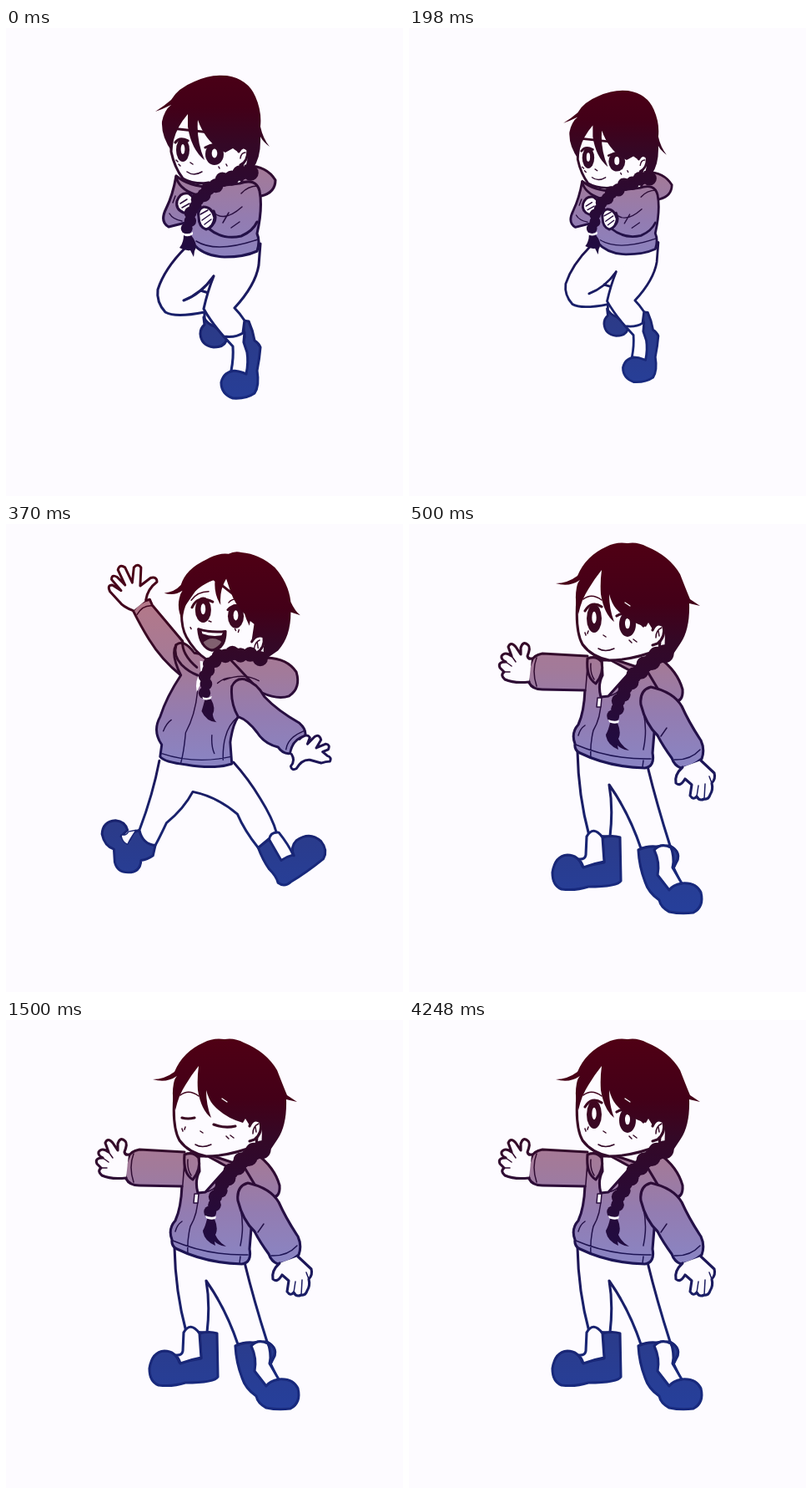
An HTML page for the animation above (6 s loop, 476 by 560 pixels).

```html
<!DOCTYPE html>
<html lang="en">
<head>
<meta charset="utf-8">
<title>Jump and wave</title>
<style>
html, body { margin: 0; width: 100%; height: 100%; overflow: hidden; background: #fdfbff; }
svg { display: block; width: 100vw; height: 100vh; }
path, ellipse { stroke: url(#ink); stroke-width: 3.1; stroke-linecap: round; stroke-linejoin: round; fill: none; }
.skin { fill: #fdfbff; }
.cloth { fill: url(#cloth); }
.boot { fill: url(#boot); }
.hair, .hair circle { fill: url(#hair); stroke: none; }
.dark { fill: url(#ink); stroke: none; }
.lite { fill: #fdfbff; stroke: none; }
.thin { stroke-width: 1.5; }
</style>
</head>
<body>
<svg viewBox="0 0 476 560">
<defs>
  <linearGradient id="ink" gradientUnits="userSpaceOnUse" x1="0" y1="40" x2="0" y2="440">
    <stop offset="0" stop-color="#4c0016"/><stop offset=".25" stop-color="#360a26"/>
    <stop offset=".42" stop-color="#2a0c3a"/><stop offset=".6" stop-color="#1d1454"/>
    <stop offset=".75" stop-color="#19206a"/><stop offset="1" stop-color="#182a7e"/>
  </linearGradient>
  <linearGradient id="hair" gradientUnits="userSpaceOnUse" x1="0" y1="20" x2="0" y2="270">
    <stop offset="0" stop-color="#500014"/><stop offset=".3" stop-color="#430018"/>
    <stop offset=".48" stop-color="#340826"/><stop offset="1" stop-color="#200c42"/>
  </linearGradient>
  <linearGradient id="cloth" gradientUnits="userSpaceOnUse" x1="0" y1="85" x2="0" y2="285">
    <stop offset="0" stop-color="#b47888"/><stop offset=".45" stop-color="#a27a9a"/>
    <stop offset=".72" stop-color="#937cb1"/><stop offset="1" stop-color="#8a84c2"/>
  </linearGradient>
  <linearGradient id="boot" gradientUnits="userSpaceOnUse" x1="0" y1="350" x2="0" y2="460">
    <stop offset="0" stop-color="#2c3a86"/><stop offset="1" stop-color="#263f9a"/>
  </linearGradient>
</defs>

<g id="crouch">
  <path class="boot" d="M237 346Q241 354 250 357L265 370Q264 382 249 382Q234 380 233 366Q233 359 238 355z"/>
  <path class="skin" d="M215 263Q190 288 182 313Q180 328 191 340Q203 347 238 340"/>
  <path d="M213 326Q234 318 249 297M233 314L246 318M238 340L238 347"/>
  <path class="boot" d="M284 350L291 351Q296 362 298 374Q303 377 305 382Q304 395 301 410Q304 428 298 437Q288 444 272 443Q258 438 258 424Q261 411 275 410L286 370z"/>
  <path class="skin" d="M261 369L272 381Q273 395 270 410Q279 410 288 414Q291 400 289 388L285 376L286 364z"/>
  <path class="skin" d="M249 297Q242 314 237 336Q246 352 261 369Q275 371 284 365L286 350Q280 341 274 335Q299 308 303 284L305 258"/>
  <path class="cloth" d="M287 165Q312 164 323 182Q323 197 306 201L280 195z"/>
  <path class="cloth" d="M204 177Q200 200 192 216Q184 232 195 238L215 233L224 258Q237 273 262 274Q286 274 301 267Q305 255 301 246Q308 215 304 195Q300 179 280 186L245 190Q220 190 204 177z"/>
  <path d="M243 240Q260 254 282 249Q296 243 301 232M249 219Q255 231 243 240M204 178Q207 192 226 199"/>
  <path class="thin" d="M252 223Q264 231 283 214M260 233L267 221M196 222Q200 229 211 231M228 255Q252 270 302 253M282 198Q290 189 302 189M270 239L280 232M200 209L203 201"/>
  <path class="skin" d="M205 207Q209 196 219 198Q228 204 226 212Q222 222 213 221Q203 217 205 207z"/>
  <path class="skin" d="M198 120L198 148Q202 167 212 180Q225 188 248 185L282 172L290 130z"/>
  <path class="skin" d="M279 148Q284 139 290 146Q290 160 281 164"/>
  <path class="thin" d="M281 156Q282 149 287 149M217 172Q225 178 235 172M221 161L224 163M204 158L206 160M207 163L209 165M255 166L256 168M264 163L265 165"/>
  <g class="eyes" data-e="212 146 8 14 250 151 11 13"></g>
  <path d="M203 137Q208 130 218 135M239 143Q252 136 266 145"/>
  <path class="hair" d="M179 100Q190 93 198 86Q206 72 226 64Q245 55 265 57Q290 61 299 82Q307 100 305 118Q308 132 316 142Q308 136 305 130Q306 155 296 168L286 170Q291 155 290 146Q285 140 279 149L272 144L263 149Q240 138 230 110Q228 135 238 158Q222 145 218 118L218 103Q205 118 201 134L199 148Q186 130 187 112Q190 98 198 92Q188 97 179 100z"/>
  <g class="hair braid" data-b="293 172 224 186 218 240 9.5 7"></g>
  <path class="hair" d="M213 248L222 248Q231 259 226 267L225 274L221 266Q215 267 208 263Q213 257 213 248z"/>
  <path class="lite" d="M212 245Q218 248 224 244L224 247Q218 251 213 248z"/>
  <path class="skin" d="M231 226Q229 217 237 214Q247 214 250 227Q249 238 240 241Q231 238 231 226z"/>
  <path class="thin" d="M209 210L217 205M211 215L220 210M233 223L242 218M235 230L245 223M238 235L246 229"/>
</g>

<g id="leap">
  <path class="boot" d="M126 360Q110 361 109 377Q112 392 124 396L125 412Q128 425 142 425Q157 425 158 410Q166 409 173 404L176 391Q161 389 156 372L148 375L144 384L133 380L141 372Q138 361 126 360z"/>
  <path class="boot" d="M305 394L319 383L328 395L350 404Q345 393 353 385Q370 373 384 386Q393 397 387 408Q366 425 346 437Q338 444 330 438Q328 430 319 421Q311 410 305 394z"/>
  <path class="skin" d="M181 285Q173 327 156 372Q160 390 176 391Q181 382 190 363Q212 345 223 324Q253 330 279 352Q288 373 305 394L328 375Q323 357 308 333Q293 308 274 287"/>
  <path class="skin thin" d="M133 378Q140 379 142 374L152 372Q145 382 141 390Q134 387 133 378z"/>
  <path class="skin" d="M319 384Q320 374 331 375Q343 390 349 403Q341 405 334 410z"/>
  <path class="cloth" d="M316 156Q342 157 353 174Q359 194 344 204Q330 209 310 200L270 185L262 158z"/>
  <path class="cloth" d="M148 97Q155 86 169 83L172 90Q188 109 210 135L218 165L208 178Q184 159 168 133Q158 117 148 97z"/>
  <path class="cloth" d="M208 178Q190 205 182 230Q172 248 184 265L182 280Q187 287 215 290Q250 296 272 289L270 262Q273 240 280 230L300 190L270 158L225 150Q212 132 202 140Q195 152 208 178z"/>
  <path class="cloth" d="M272 192Q277 181 288 183Q304 188 313 205Q329 222 357 238Q366 246 364 254Q348 258 345 276Q336 277 330 268Q313 264 304 250Q292 234 280 230Q270 213 272 192"/>
  <path class="lite" d="M232 160L242 162L236 182L228 199Q225 184 233 174z"/>
  <path d="M202 140Q198 153 209 165Q218 174 229 178M210 135Q209 152 228 168"/>
  <path class="thin" d="M229 198Q226 228 214 250Q212 273 208 288M184 276Q226 290 271 280M186 248Q190 238 196 234M262 184Q287 174 306 185M247 253Q246 267 250 276M280 230Q260 245 261 284M153 102Q160 90 172 91M340 271Q342 256 362 248M254 188Q262 181 270 181"/>
  <path class="skin" d="M148 97Q135 92 131 86L119 73Q115 65 122 65L133 72L121 58Q121 51 128 55L138 65L129 46Q131 38 138 43L147 62L149 43Q154 37 158 43L157 66L170 56Q178 54 178 61Q166 70 164 84"/>
  <path class="skin" d="M347 277Q352 285 346 292Q347 298 353 295Q360 283 370 284L384 288Q390 286 395 286Q398 281 392 279L386 274L393 271Q396 265 390 264L378 269L384 259Q382 251 376 255L367 264L370 256Q366 250 357 258"/>
  <path class="skin" d="M209 95Q208 118 215 130Q225 148 240 158L262 158L302 150L304 100L240 50z"/>
  <path class="skin" d="M297 136Q303 126 312 130Q314 143 303 150Q296 151 295 145"/>
  <path class="thin" d="M300 145Q301 136 307 134M304 137L305 144M243 110L246 111M276 120L277 122M281 121L280 124M220 118L221 120M221 84Q229 73 243 73M268 87Q273 81 282 83"/>
  <g class="eyes" data-e="236 96 10 16 277 104 10 15"></g>
  <path d="M222 93Q229 77 248 86M267 96Q277 85 288 97"/>
  <path class="dark" d="M230 120Q245 125 264 123Q264 145 247 147Q232 143 230 120z"/>
  <path class="lite" d="M234 122Q247 126 261 124L259 128Q246 130 235 126z"/>
  <path d="M235 138Q246 127 259 136Q253 145 246 145Q239 144 235 138z" style="fill:#80606f;stroke:none"/>
  <path d="M230 120Q245 125 264 123Q264 145 247 147Q232 143 230 120z"/>
  <path class="hair" d="M187 75Q200 74 208 65Q214 45 240 33Q256 24 268 26Q275 22 284 24Q307 26 326 43Q343 62 346 86Q351 97 358 103L346 99Q346 130 330 147L314 158Q310 148 313 138Q312 127 304 128Q300 130 297 134L300 114L295 110L294 116Q290 108 288 101Q276 90 270 72L265 57Q256 72 258 90Q249 76 251 58Q228 66 217 84Q211 95 210 110Q203 95 206 82Q207 76 210 72Q200 79 187 75z"/>
  <g class="hair braid" data-b="308 156 232 136 239 200 9.5 7.5"></g>
  <path class="hair" d="M238 209L246 208Q252 219 248 227Q249 234 253 237Q240 236 234 223Q236 217 238 209z"/>
  <path class="lite" d="M235 205Q241 208 247 204L246 207Q241 210 236 208z"/>
</g>

<g id="stand">
  <path class="skin" d="M202 272Q203 325 216 373L241 374Q245 340 240 312Q264 346 278 388L313 385Q297 335 286 290"/>
  <path class="boot" d="M232 375Q244 372 253 375L254 427Q250 434 215 434Q200 439 183 437Q172 433 172 417Q175 397 190 396Q203 396 208 410L234 405z"/>
  <path class="skin" d="M212 396L213 374Q221 360 232 375L234 404Q222 406 209 411Q207 404 203 401Q211 402 212 396z"/>
  <path class="boot" d="M275 390Q285 385 296 386L313 385Q324 391 322 402L317 411L326 430Q344 428 350 441Q354 458 341 465Q326 467 312 464Q302 459 300 450Q287 441 283 428Q276 410 275 390z"/>
  <path class="skin" d="M294 390Q302 381 314 387Q320 397 316 411L327 430Q316 432 312 438L298 420Q301 405 294 390z"/>
  <path class="boot" d="M314 386Q325 392 322 401L317 412Q318 397 314 386z"/>
  <path class="cloth" d="M300 160Q322 176 328 198Q329 213 318 212Q300 195 284 192Q275 185 280 172z"/>
  <path class="cloth" d="M214 162L211 198Q210 225 203 240Q194 250 199 263Q198 271 205 274Q240 291 283 292Q295 290 292 274L294 250L300 200L285 175L240 160z"/>
  <path class="cloth" d="M214 158L160 155Q149 157 147 164Q140 178 144 190Q148 198 160 198L211 199"/>
  <path class="cloth" d="M278 216Q276 199 290 195Q317 201 327 218Q336 238 350 259Q355 270 351 281Q339 291 326 292Q318 289 315 280Q304 265 298 253Q284 240 278 216"/>
  <path class="skin" d="M231 163L242 163L266 176L239 206L230 207Q226 192 232 181z"/>
  <path class="cloth" d="M214 161Q225 157 231 165Q234 179 224 191Q212 184 214 161z"/>
  <path class="thin" d="M230 207Q231 230 221 247Q217 263 218 280M200 264Q242 282 290 281M153 160Q147 176 153 194M318 282Q337 283 349 270M281 225Q286 247 281 270M218 167Q217 179 222 186M203 253Q205 245 211 241M302 254L309 244M239 206Q252 203 262 190M281 283L280 291"/>
  <path class="skin thin" d="M226 208L231 208L230 219L225 219z"/>
  <path class="skin" d="M147 161Q143 162 142 158Q146 148 143 145Q137 139 134 148L134 156L128 147Q122 140 119 147L123 158Q115 152 111 158Q110 162 116 165Q106 165 109 172L114 177Q109 181 115 186Q126 191 144 189"/>
  <path class="thin" d="M123 158L128 165M116 165L123 170M114 177L121 177"/>
  <path class="skin" d="M328 291Q318 300 320 310Q325 315 331 305L339 312L337 325Q341 331 345 326Q348 332 354 329Q359 330 361 324Q365 318 363 310Q368 305 366 298L350 283"/>
  <path class="thin" d="M345 326L347 313M354 329L355 311M363 310L360 302"/>
  <path class="skin" d="M202 90Q199 128 208 144Q219 159 240 163Q268 163 300 150L304 110L230 50z"/>
  <path class="skin" d="M292 127Q297 116 305 122Q308 135 298 143L292 145"/>
  <path class="thin" d="M296 136Q296 127 303 124M299 128L300 134M227 149Q235 154 246 149M233 133L236 135M211 130L212 133M215 128L214 131M264 139L267 142M269 138L273 141M209 90Q219 82 231 91"/>
  <g id="open">
    <g class="eyes" data-e="222 113 9 17 262 120 10 15"></g>
    <path d="M211 104Q219 91 231 99M249 110Q261 101 281 122"/>
  </g>
  <path id="shut" d="M211 117Q218 119 226 117M249 125Q262 130 275 127"/>
  <path class="hair" d="M176 71Q190 71 202 62Q212 38 237 27Q248 21 262 23Q274 21 285 27Q312 38 325 60Q332 78 337 90L349 98L336 95Q337 125 326 142L316 157L306 150Q309 122 301 119Q294 119 292 126L287 118L284 123Q262 117 248 101Q243 95 240 84Q240 102 246 117Q234 108 230 84Q229 70 231 55Q222 66 215 78Q207 90 203 108Q198 92 201 76Q202 70 205 67Q192 76 176 71z"/>
  <path d="M259 94L265 98" style="stroke:#fdfbff;stroke-width:1.3"/>
  <g class="hair braid" data-b="306 154 260 178 246 230 11 7.5"></g>
  <path class="hair" d="M241 238L250 238Q255 250 251 257Q255 266 264 271Q255 270 250 265L251 270Q237 264 236 252Q239 247 241 238z"/>
  <path class="lite" d="M239 234Q245 237 252 235L251 238Q245 240 240 237z"/>
</g>
</svg>
<script>
const $ = id => document.getElementById(id);
const nums = s => s.split(" ").map(Number);
const oval = (x, y, rx, ry, c) => `<ellipse class="${c}" cx="${x}" cy="${y}" rx="${rx}" ry="${ry}"/>`;

// Two strands of lumps weaving along a quadratic curve.
function braid(x0, y0, x1, y1, x2, y2, r0, r1) {
  const count = 12;
  let out = "";
  for (let i = 0; i < count; i++) {
    const t = i / (count - 1), u = 1 - t;
    const dx = u * (x1 - x0) + t * (x2 - x1), dy = u * (y1 - y0) + t * (y2 - y1);
    const off = (i % 2 ? 1.3 : -1.3) / Math.hypot(dx, dy);
    const x = u * u * x0 + 2 * u * t * x1 + t * t * x2 - dy * off;
    const y = u * u * y0 + 2 * u * t * y1 + t * t * y2 + dx * off;
    out += `<circle cx="${x}" cy="${y}" r="${r0 + (r1 - r0) * t}"/>`;
  }
  return out;
}

const eye = (x, y, rx, ry) =>
  oval(x, y, rx, ry, "dark") + oval(x, y - 1, rx * .3, ry * .42, "lite");

for (const g of document.querySelectorAll(".braid")) g.innerHTML = braid(...nums(g.dataset.b));
for (const g of document.querySelectorAll(".eyes")) {
  const e = nums(g.dataset.e);
  g.innerHTML = eye(...e.slice(0, 4)) + eye(...e.slice(4));
}

const show = (id, on) => $(id).setAttribute("display", on ? "inline" : "none");
const pose = (id, on, shift, scale) => {
  show(id, on);
  $(id).setAttribute("transform", `translate(${shift} ${shift}) scale(${scale})`);
};

function draw(t) {
  const low = t >= 120, settle = t >= 370, blink = t >= 1500 && t < 1620;
  pose("crouch", t < 250, low ? 23.5 : 0, low ? .903 : 1);
  pose("leap", t >= 250 && t < 500, settle ? 11 : 0, settle ? .955 : 1);
  show("stand", t >= 500);
  show("open", !blink);
  show("shut", blink);
}

const start = performance.now();
function tick() {
  draw((performance.now() - start) % 6000);
  requestAnimationFrame(tick);
}
tick();
</script>
</body>
</html>
```
